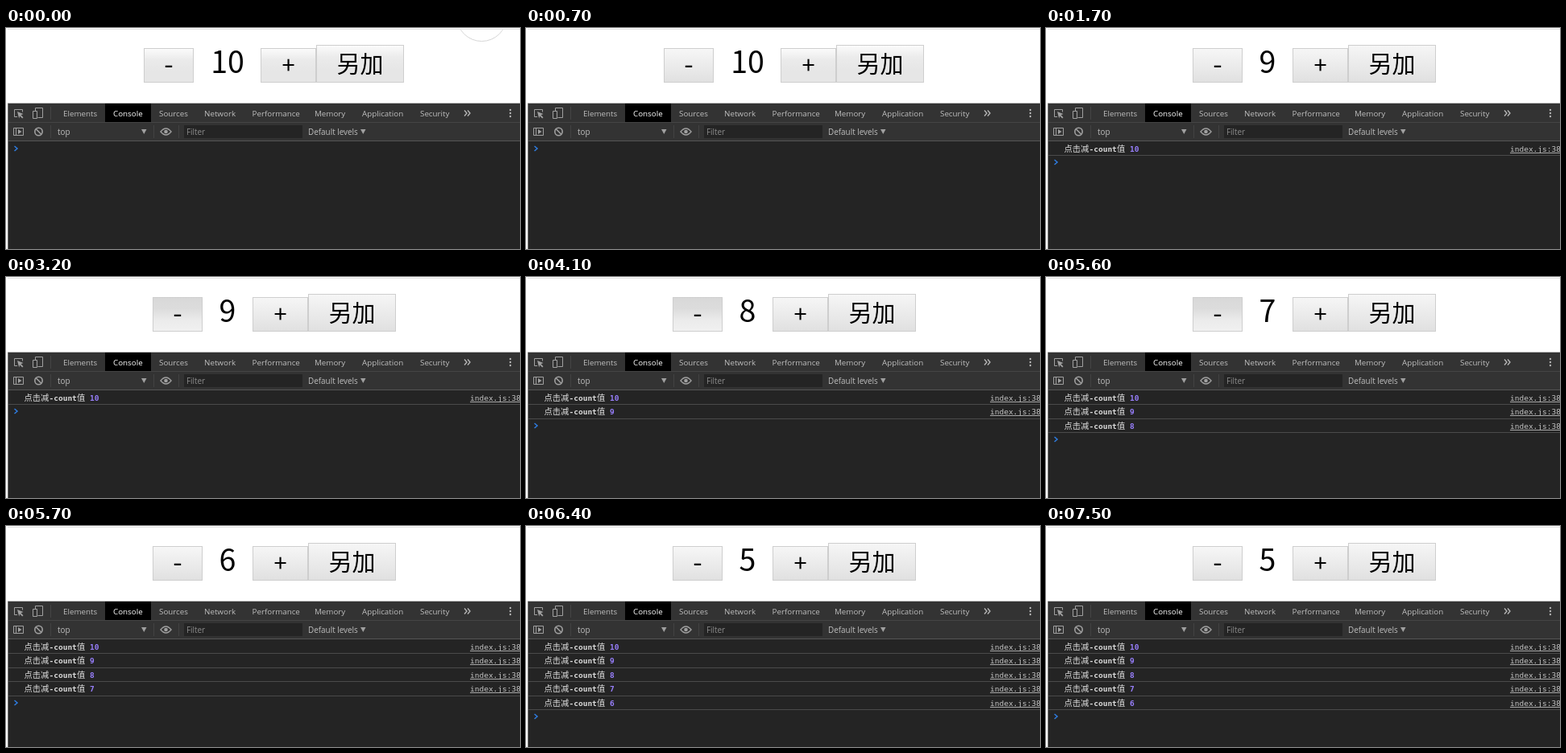
These frames come from a looping animation (638 px wide and 275 px high, 8000 ms). An HTML page with a canvas:

```html
<!DOCTYPE html>
<html lang="zh">
<head>
<meta charset="utf-8">
<title>Counter and console</title>
<style>
html, body { margin: 0; width: 100%; height: 100%; overflow: hidden; background: #fff; }
canvas { display: block; }
</style>
</head>
<body>
<canvas id="stage" width="638" height="275"></canvas>
<script>
const ctx = document.getElementById('stage').getContext('2d');
const LOOP = 8000;
const PRESSES = [1600, 3200, 4100, 5600, 6300];
const PRESS_TIME = 100;
const PITCH = 17.5;
const UI = '"Open Sans", "Noto Sans", sans-serif';
const CJK = '"Noto Sans CJK SC", "Noto Sans CJK", sans-serif';
const MONO = '"DejaVu Sans Mono", monospace';

function rect(x, y, w, h, color) {
  ctx.fillStyle = color;
  ctx.fillRect(x, y, w, h);
}

function text(str, x, y, size, color, family = UI, align = 'left', weight = '') {
  ctx.font = `${weight} ${size}px ${family}`;
  ctx.textAlign = align;
  ctx.fillStyle = color;
  ctx.fillText(str, x, y);
}

function stroke(path, color, width = 1) {
  ctx.strokeStyle = color;
  ctx.lineWidth = width;
  ctx.stroke(new Path2D(path));
}

function fill(path, color) {
  ctx.fillStyle = color;
  ctx.fill(new Path2D(path));
}

function circle(x, y, r, color, width) {
  ctx.beginPath();
  ctx.arc(x, y, r, 0, 7);
  if (width) {
    ctx.strokeStyle = color;
    ctx.lineWidth = width;
    ctx.stroke();
  } else {
    ctx.fillStyle = color;
    ctx.fill();
  }
}

function button(x, y, w, label, size, labelY, colors) {
  const h = 68 - y;
  const shade = ctx.createLinearGradient(0, y, 0, y + h);
  colors.forEach((c, i) => shade.addColorStop(i / (colors.length - 1), c));
  rect(x, y, w, h, shade);
  ctx.strokeStyle = '#cecece';
  ctx.lineWidth = 1;
  ctx.strokeRect(x + .5, y + .5, w - 1, h - 1);
  text(label, x + w / 2, labelY, size, '#000', CJK, 'center', 300);
}

function drawPage(t, count, pressed) {
  rect(0, 0, 638, 94, '#fff');
  rect(2, 1, 636, 1, '#e2e2e2');
  if (t < 300) {
    ctx.save();
    ctx.beginPath();
    ctx.rect(0, 2, 638, 30);
    ctx.clip();
    circle(590.5, -14.5, 31, '#d6d6d6', 1);
    ctx.restore();
  }
  const shift = count > 9 ? 0 : 10;
  const rest = count > 9 ? ['#fcfcfc', '#ebebeb', '#e6e6e6', '#e6e6e6'] : ['#f6f6f6', '#e0e0e0'];
  const hover = t < 700 ? rest : ['#f7f7f7', '#e0e0e0'];
  const minus = pressed ? ['#d8d8d8', '#dcdcdc', '#ebebeb', '#f1f1f1'] : hover;
  button(171 + shift * 1.1, 25, 62, '-', 33, 57, minus);
  text(count, 275, 56, 37.5, '#000', CJK, 'center', 300);
  button(316 - shift, 25, 69, '+', 29, 57, rest);
  button(385 - shift, 21, 109, '另加', 29, 56, rest);
}

function drawTabs() {
  rect(2, 93, 636, 1, '#b8b8b8');
  rect(2, 94, 636, 47, '#333');
  rect(2, 117, 636, 1, '#444');
  rect(2, 140, 636, 1, '#555');
  rect(123, 94, 57, 23, '#000');
  const tabs = { Elements: 71, Console: 133, Sources: 190, Network: 246, Performance: 305.5,
    Memory: 383, Application: 442, Security: 514 };
  for (const name in tabs)
    text(name, tabs[name], 110, 9.8, name === 'Console' ? '#fff' : '#bebebe');

  const icon = '#a0a0a0';
  stroke('M14 110.5h-3.5v-9h10v3', icon);
  fill('M14 104l7.5 3-3 1.2 3 3-1.3 1.3-3-3-1 3z', icon);
  stroke('M36.5 103v-3.5h9v12h-6M33.5 103.5h5v9h-5z', icon);
  stroke('M569 102.5l3 3.5-3 3.5M573 102.5l3 3.5-3 3.5', '#b8b8b8', 1.3);
  for (const y of [102, 106, 110]) circle(626, y, 1.2, '#b0b0b0');
  rect(55, 98, 1, 16, '#444');
}

function drawToolbar() {
  const icon = '#a0a0a0';
  stroke('M9.5 124.5h12v9h-12zM12.5 124.5v9', icon);
  fill('M15 126l4.5 3-4.5 3z', icon);
  circle(40.5, 129, 4.7, icon, 1.6);
  stroke('M37.2 125.7l6.6 6.6', icon, 1.6);
  for (const x of [55, 183, 214]) rect(x, 121, 1, 16, '#424242');
  text('top', 64, 133, 9.9, '#bebebe');
  fill('M168 126h6.5l-3.2 6z', icon);
  stroke('M192 129q6.5-8 13 0q-6.5 8-13 0z', icon, 1.4);
  circle(198.5, 129, 2.3, icon);
  rect(221, 121, 147, 16, '#242424');
  text('Filter', 224, 133, 9.9, '#8c8c8c');
  text('Default levels', 375, 133, 9.9, '#bebebe');
  fill('M440 126h6.5l-3.2 6z', icon);
}

function drawConsole(rows) {
  rect(2, 141, 636, 134, '#242424');
  for (let i = 0; i < rows; i++) {
    const y = Math.floor(154 + i * PITCH);
    text('点击减', 22.5, y, 10.3, '#dcdcdc', CJK);
    text('-count', 53.5, y, 9.5, '#dcdcdc', MONO, 'left', 'bold');
    text('值', 88, y, 10.3, '#dcdcdc', CJK);
    text(10 - i, 104, y, 9.5, '#9980ff', MONO, 'left', 'bold');
    text('index.js:38', 576, y, 9.5, '#c4c4c4', MONO);
    rect(576, y + 1, 62, 1, '#a8a8a8');
    rect(2, Math.floor(141 + (i + 1) * PITCH), 636, 1, '#4a4a4a');
  }
  const y = Math.floor(150 + rows * PITCH);
  stroke(`M10.5 ${y - 3}l3.5 3-3.5 3`, '#2f7de1', 1.5);
}

function draw(now) {
  const t = now % LOOP;
  const clicks = PRESSES.filter(p => t >= p + PRESS_TIME).length;
  const pressed = PRESSES.some(p => t >= p && t < p + PRESS_TIME);
  drawPage(t, 10 - clicks, pressed);
  drawTabs();
  drawToolbar();
  drawConsole(clicks);
  rect(2, 94, 1, 181, '#707070');
  requestAnimationFrame(() => draw(performance.now() - start));
}

const start = performance.now();
draw(0);
</script>
</body>
</html>
```
